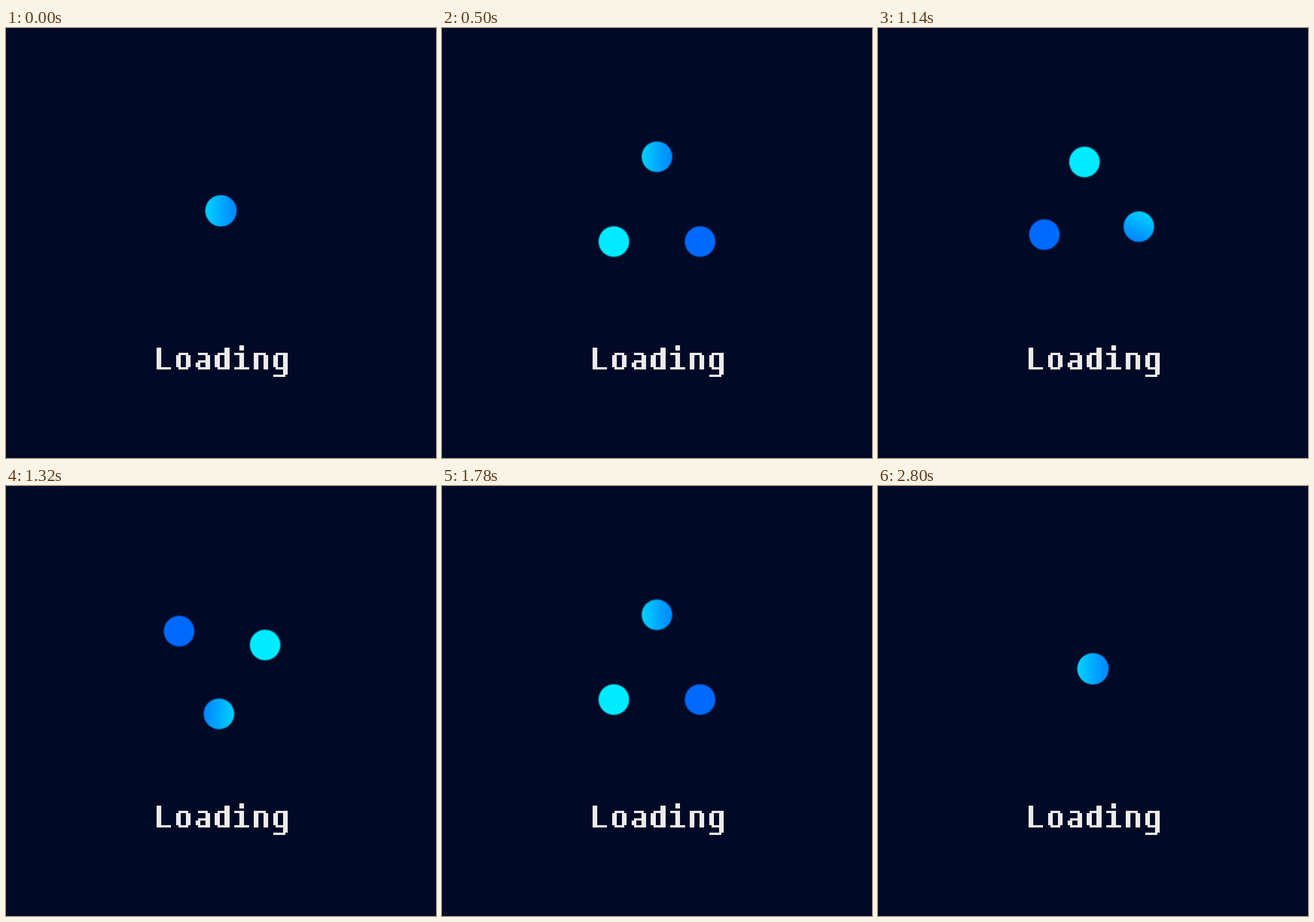
These frames come from a looping animation (748 by 748 pixels, 2.98 s). An HTML page with a canvas:

```html
<!DOCTYPE html>
<html lang="en">
<head>
<meta charset="utf-8">
<title>Loading</title>
<style>
  html, body { margin: 0; width: 100%; height: 100%; overflow: hidden; background: #000a27; }
  canvas { display: block; }
</style>
</head>
<body>
<canvas id="stage" width="748" height="748" role="img" aria-label="Loading"></canvas>
<script>
const ctx = document.getElementById('stage').getContext('2d');
const LOOP = 2980, CX = 374, CY = 318;

// Rest position and rotation pivot of each dot, relative to the centre
const dots = [
  { x: -75, y: 53.5, px: -0.7, py: 3.5 },
  { x: 75, y: 53.5, px: -0.9, py: -3.5 },
  { x: 0, y: -94, px: 1.1, py: -7.75 }
];

// Pixel lettering: strokes as column, row, width, height on an 8-column cell
const glyphs = {
  L: ['0 1 2 9', '0 9 6 1'],
  o: ['1 3 4 1', '0 4 2 5', '4 4 2 5', '1 9 4 1'],
  a: ['1 3 4 1', '4 4 2 6', '1 6 4 1', '0 7 2 2', '1 9 4 1'],
  d: ['4 1 2 9', '1 3 4 1', '0 4 2 5', '1 9 4 1'],
  i: ['2 0 2 2', '0 3 4 1', '2 3 2 7', '0 9 6 1'],
  n: ['0 3 5 1', '0 3 2 7', '4 4 2 6'],
  g: ['1 3 5 1', '0 4 2 5', '1 9 4 1', '4 3 2 9', '0 12 5 1']
};
const CELL = 4.225;

const progress = (t, from, to) => Math.min(1, Math.max(0, (t - from) / (to - from)));

function drawText(text, left, top) {
  const snapX = c => Math.round(left + c * CELL);
  const snapY = r => Math.round(top + r * CELL);
  ctx.fillStyle = '#ecebec';
  [...text].forEach((letter, i) => {
    for (const stroke of glyphs[letter]) {
      const [c, r, w, h] = stroke.split(' ').map(Number);
      const x = snapX(c + i * 8), y = snapY(r);
      ctx.fillRect(x, y, snapX(c + i * 8 + w) - x, snapY(r + h) - y);
    }
  });
}

function disc(radius, alpha) {
  ctx.globalAlpha = alpha;
  ctx.beginPath();
  ctx.arc(0, 0, radius, 0, 2 * Math.PI);
  ctx.fill();
}

function drawDot({ x, y, px, py }, spread, angle) {
  ctx.save();
  ctx.translate(CX, CY);
  if (angle) {
    ctx.translate(px, py);
    ctx.rotate(angle);
    ctx.translate(-px, -py);
  }
  ctx.translate(x * spread, y * spread);
  // One gradient spans the whole group
  const shift = x * spread;
  const fill = ctx.createLinearGradient(-45 - shift, 0, 45 - shift, 0);
  fill.addColorStop(0, '#00ebff');
  fill.addColorStop(1, '#006aff');
  ctx.fillStyle = fill;
  disc(27.6, 0.4);
  disc(26, 1);
  ctx.restore();
}

function draw(now) {
  const t = now % LOOP;
  const spread = progress(t, 0, 500) - progress(t, 2397, 2797);
  const angle = 2 * Math.PI * (progress(t, 840, 1780) % 1);
  ctx.fillStyle = '#000a27';
  ctx.fillRect(0, 0, 748, 748);
  for (const dot of dots) drawDot(dot, spread, angle);
  drawText('Loading', 262, 552.2);
}

let start;
function tick(now) {
  start ??= now;
  draw(now - start);
  requestAnimationFrame(tick);
}
requestAnimationFrame(tick);
</script>
</body>
</html>
```
